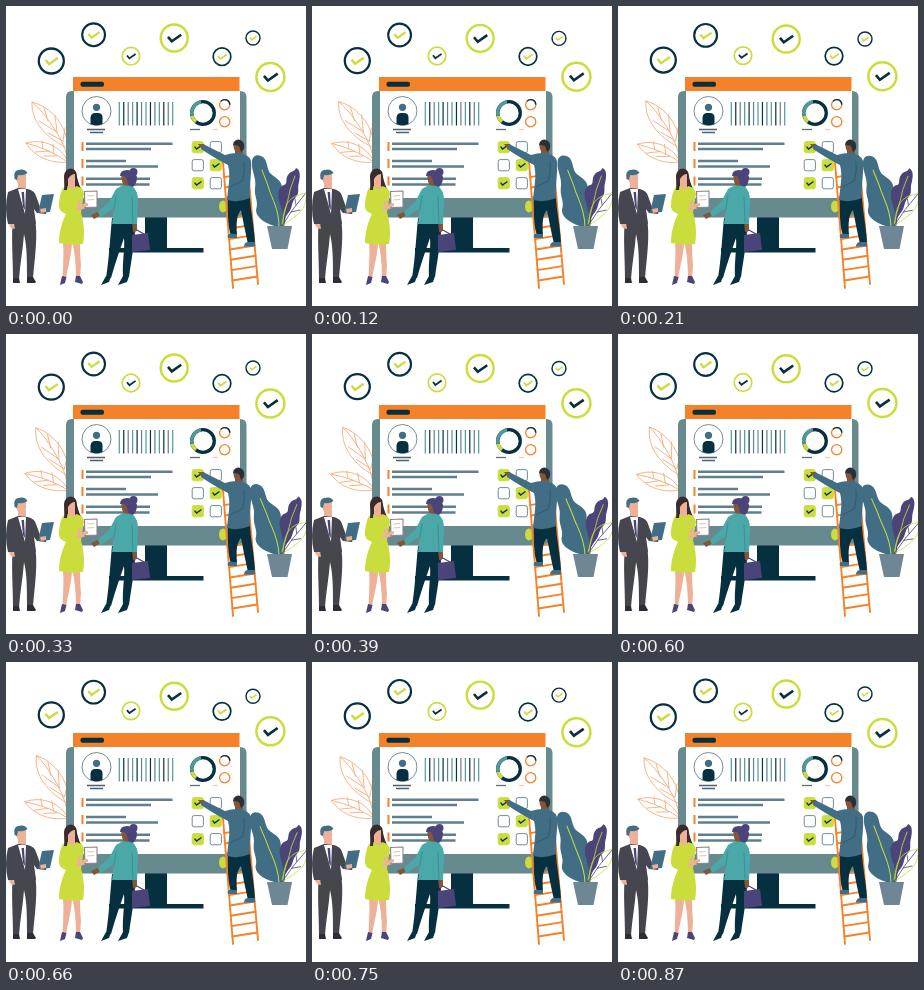
Animation, 300 px wide and 300 px high, one loop 0.9 s. Source, as an HTML page:

```html
<!DOCTYPE html>
<html lang="en">
<head>
<meta charset="utf-8">
<title>Checklist team</title>
<style>
html, body { margin: 0; width: 100%; height: 100%; overflow: hidden; background: #fff; }
svg { display: block; width: 100vw; height: 100vh; }
.navy { fill: #06303f; } .frame { fill: #678a8f; } .lime { fill: #cbdd3c; } .orange { fill: #f58229; }
.fair { fill: #eeb197; } .brown { fill: #85553b; } .teal { fill: #4aa9a8; } .blue { fill: #416e85; } .purple { fill: #4b4478; }
.line { fill: none; stroke-linecap: round; stroke-linejoin: round; }
</style>
</head>
<body>
<svg viewBox="0 0 300 300">
  <!-- outlined leaves -->
  <g class="line" stroke="#f7ad7c" stroke-width="0.9">
    <g id="leafTop">
      <path d="M62 142C45 135 25 119 26 96C45 101 61 119 62 142M62 156Q60 140 48 122T26 96M57 135L42 127M51 126L33 115M51 126L49 109M57 135L59 122M42 115L38 102"/>
    </g>
    <g id="leafLow">
      <path d="M62 156C47 158 29 152 20 137C38 132 56 141 62 156M62 156Q43 143 20 137M51 150L38 150M43 145L29 146M48 148L47 138M37 142L36 135"/>
    </g>
  </g>

  <!-- monitor -->
  <path class="navy" d="M139 209H161V242H197.500V246.500H103V242H139Z"/>
  <path class="frame" d="M66 85H234Q240.500 85 240.500 91V206Q240.500 211.500 235 211.500H65Q60 211.500 60 206V91Q60 85 66 85Z"/>
  <path fill="#fff" d="M68 85H234V192H68Z"/>
  <path class="orange" d="M67 71H233.500V85H67Z"/>
  <rect class="navy" x="74.500" y="75.800" width="23.500" height="5" rx="2"/>
  <circle cx="90.500" cy="105" r="14.500" fill="#fff" stroke="#587080" stroke-width=".8"/>
  <circle class="blue" cx="90.500" cy="101.300" r="3.600"/>
  <path class="navy" d="M84.500 118V111.500Q85 107 89 107H92Q96.500 107 96.500 111.500V118Q90.500 120.500 84.500 118Z"/>
  <path stroke="#496070" stroke-width="1.400" d="M81 123.500H99M84 126.500H97"/>
  <g id="bars"></g>
  <g fill="none" stroke-width="3.300">
    <circle cx="197" cy="107" r="11.300" stroke="#06303f"/>
    <path stroke="#4f9a9c" d="M185.900 109A11.300 11.300 0 0 1 195 95.900"/>
    <path stroke="#cbdd3c" d="M190 115.900A11.300 11.300 0 0 1 186 109.500"/>
  </g>
  <path stroke="#587080" stroke-width="1.300" d="M184 123.500H194"/>
  <path stroke="#f9c9a8" stroke-width="1.300" d="M207 123.500H212"/>
  <g fill="none" stroke="#f58229" stroke-width="1.300">
    <circle cx="218.700" cy="98.700" r="5.100"/>
    <circle cx="218.700" cy="115.700" r="5.100"/>
    <path stroke="#06303f" d="M215 95.200A5.100 5.100 0 0 1 223.800 98.700"/>
  </g>
  <path class="orange" d="M75.500 136h2v9h-2zM75.500 153h2v9h-2zM75.500 170.500h2v9h-2z"/>
  <path stroke="#5f7f90" stroke-width="2.500" d="M80 137.700H166.500M80 143H145M80 155H120M80 160.500H152M80 172.700H144M80 178.500H143.500"/>
  <g id="boxes"></g>

  <!-- plant -->
  <g id="leafLeft">
    <path class="blue" d="M272 221C260 218 250 212 250 204C253 195 248 191 249 182C251 172 245 165 246 156C246 151 250 148 255 150C262 153 260 161 264 167C269 172 276 174 276 182C275 189 280 193 279 200C278 207 281 213 278 221Z"/>
    <path class="line" stroke="#cbdd3c" stroke-width="1" d="M273 221C273 203 266 193 263 183C261 176 258 170 256 164"/>
  </g>
  <g id="leafRight">
    <path class="purple" d="M275 219C280 210 275 203 273 194C271 185 274 180 278 179C282 178 279 173 282 169C285 164 288 167 290 162C295 164 294 171 293 176C291 182 294 187 290 191C285 196 287 201 283 206C279 211 278 215 277 220Z"/>
    <path class="line" stroke="#cbdd3c" stroke-width=".8" d="M276 218C279 204 282 195 284 184L289 170"/>
  </g>
  <g id="leafOut">
    <path class="line" stroke="#cbdd3c" stroke-width=".8" d="M277 219C277 207 279 196 288 191C292 188 296 189 301 186C300 195 299 202 292 208Q287 213 277 219"/>
    <path class="line" stroke="#4b4478" stroke-width=".8" d="M276 220Q286 203 299 188M285 206L294 204M290 199L289 193"/>
  </g>
  <path fill="#6f8795" d="M261 220H286L281.500 243H266Z"/>

  <!-- ladder and climber -->
  <ellipse class="lime" cx="217" cy="200.500" rx="4" ry="6"/>
  <g id="ladder" class="line" stroke="#f58229" stroke-width="1.900"></g>
  <path class="navy" d="M222 191L244 189C244 202 248 218 249 237L242 238C239 225 237 214 235 204C231 208 230 216 231 229L225 230C221 216 222 203 222 191Z"/>
  <path class="blue" d="M223 228H231V232H222Q221 229 223 228ZM241 236H249V240.500H238Q238 237 241 236Z"/>
  <path class="brown" d="M229 140H237V150H229ZM192 138L198 138L200 142L195 142Z"/>
  <path class="blue" d="M197 138L219 149Q225 147 231 147Q242 147 245 155C246 167 243 179 244 192Q233 197 221 194C222 181 225 170 222 159Q210 153 195 143Z"/>
  <path class="line" stroke="#31586d" stroke-width=".9" d="M238 156Q239 167 236 175L224 181"/>
  <path class="brown" d="M227 138H236V146Q230 148 228 143Z"/>
  <path fill="#2b2f38" d="M227 138.500Q228 133.500 233 133.500Q239.500 135 238 143L235 146L233 140Z"/>

  <!-- man in suit -->
  <path fill="#44464c" d="M7 213H29C32 229 29 250 27 272H21C21 255 21 240 18 228C17 243 14 258 13 273H7C7 252 5 232 7 213Z"/>
  <path fill="#2d2d38" d="M7 272H13L14 277H7ZM21 271H27L30 276L29 277H21Z"/>
  <path class="fair" d="M12 176H20V187H12ZM2 217H8L9 223L5 222Z"/>
  <path fill="#45464f" d="M2 186L12 182L22 183Q29 185 30 190L34 201L41 203L40 208L31 207L28 203L30 218H7L8 205L8 218L2 218Q-2 202 2 186Z"/>
  <path fill="#fff" d="M12 183L20 183L19 208Z"/>
  <path class="purple" d="M15.500 186L18 186L19 204L17 201Z"/>
  <path class="fair" d="M10 167H20V174Q19 180 15 180Q11 178 10 172Z"/>
  <path class="blue" d="M8.500 173Q7 165 12 164Q19 162 21.500 167Q17 170 12 169L11 174Z"/>
  <path class="blue" d="M36 189L48 188L44 206L32 207Z"/>
  <path class="fair" d="M34 203L40 202L40 206L35 207Z"/>

  <!-- woman in dress -->
  <path fill="#3a2c2e" d="M58 170Q59 162.500 65 162.500Q71 163 71 171Q73 180 76 184L72 194H62Q58 184 58 170Z"/>
  <path class="fair" d="M57 235H66C66 248 62 260 60 273H56.500C57 260 58 247 57 235ZM66 235H74Q74 249 75 259L74 273H70Q70 250 66 235Z"/>
  <path class="purple" d="M56 270L60.500 271L59 277L54 279ZM70 270H74L77 276L76 278L69 276Z"/>
  <path class="fair" d="M62 173H69V185H62Z"/>
  <path class="lime" d="M57 182L62 180L67 184L70 180Q77 181 78 188L75 206C78 218 79 228 77 238Q65 240 53 237C53 226 56 216 60 208L56 206Q52 203 53 197Q54 187 57 182Z"/>
  <path class="fair" d="M61 168H69V174Q68 179 65 179Q61 177 61 172Z"/>
  <path fill="#3a2c2e" d="M59 173Q59 163.500 65 163.500Q71 164.500 71 173L69 168Q65 168 62 173L61 184L58 184Z"/>
  <path class="line" stroke="#eeb197" stroke-width="3" d="M74 195L72 203L81 200"/>
  <path fill="#fff" stroke="#8c8390" stroke-width="1.100" d="M78.500 185.500L91 185V201L79 201.500Z"/>
  <path stroke="#e3c4b8" d="M81 190L88 189.500M81 194L88 193.500"/>
  <path class="fair" d="M76 198L82 197V200L77 201Z"/>

  <!-- woman with bag -->
  <path class="navy" d="M106 212H130C130 228 126 250 123 271H117C116 256 119 243 118 232C113 246 109 258 105 272H100C103 254 104 233 106 212Z"/>
  <path class="navy" d="M100 270H105L103 276L95 279ZM117 270H123L121 276L112 279Z"/>
  <path class="brown" d="M117 174H126V186H117ZM85 209L94 205L95 209L88 213Z"/>
  <path class="line" stroke="#4b4478" stroke-width="1.200" d="M128 229L129 223L138 228"/>
  <path class="purple" d="M126 229L142 227L144 244L126 246Z"/>
  <path class="brown" d="M126 215H131V225L127 226Z"/>
  <path class="teal" d="M110 183L117 179L126 180Q132 184 132 195L131 218H106L108 202L94 211L92 206L103 196Z"/>
  <path class="line" stroke="#378d90" stroke-width=".9" d="M126 191L127 217M110 190L108 203"/>
  <path class="brown" d="M115 168H123V179Q117 181 116 175Z"/>
  <path class="purple" d="M114 170Q114 164 121 164Q129 164 131 171Q131 178 127 181L122 179Q122 174 119 170Z"/>
  <circle class="purple" cx="127.500" cy="166" r="4"/>

  <g id="ticks"></g>
</svg>
<script>
const NS = "http://www.w3.org/2000/svg";
const NAVY = "#06303f", LIME = "#cbdd3c", TEAL = "#4f9a9c", SLATE = "#5f7f90";
const LOOP = 900, PEAK = 540, STEP = 30;
const get = id => document.getElementById(id);

function add(parent, tag, attrs) {
  const el = document.createElementNS(NS, tag);
  for (const key in attrs) el.setAttribute(key, attrs[key]);
  return parent.appendChild(el);
}

function check(parent, x, y, r, color, width) {
  add(parent, "path", {
    fill: "none", stroke: color, "stroke-width": width,
    d: `M${x - r * .46} ${y - r * .08}L${x - r * .18} ${y + r * .25}L${x + r * .52} ${y - r * .24}`
  });
}

const tones = [TEAL, NAVY, SLATE];
for (let i = 0; i < 13; i++) {
  add(get("bars"), "rect", { x: 112.7 + i * 4.45, y: 96, width: 1.2, height: 23.5, fill: tones[i % 3] });
}

for (let row = 0; row < 3; row++) for (let col = 0; col < 2; col++) {
  const x = 186.2 + col * 18, y = 135.6 + row * 18, on = (row + col) % 2 === 0;
  add(get("boxes"), "rect", {
    x, y, width: 11.2, height: 11.2, rx: 2,
    fill: on ? LIME : "#fff", stroke: on ? LIME : SLATE, "stroke-width": .9
  });
  if (on) check(get("boxes"), x + 5.6, y + 5.6, 7, NAVY, 1.4);
}

const ladder = get("ladder");
const left = k => `${217 + 10 * k} ${156 + 126 * k}`;
const right = k => `${241 + 11 * k} ${152 + 126 * k}`;
add(ladder, "path", { d: `M${left(0)}L${left(1)}M${right(0)}L${right(1)}` });
for (let i = 0; i < 11; i++) {
  const k = .12 + i * .082;
  add(ladder, "path", { d: `M${left(k)}L${right(k)}` });
}

// x, y, radius, vertical travel, lime ring
const ticks = [
  [45.3, 55, 12.5, -2.8, 0], [87.6, 28.8, 11.4, 1.8, 0], [125, 50.2, 8.8, -1.8, 1],
  [168.2, 32, 13.5, 3, 1], [216, 50.7, 8.8, -1.8, 0], [247, 32, 7, 3, 0], [264.4, 71, 14, -2.2, 1]
].map(([x, y, r, travel, lime]) => {
  const el = add(get("ticks"), "g", {});
  const ring = lime ? LIME : NAVY, mark = lime ? NAVY : LIME;
  add(el, "circle", { cx: x, cy: y, r, fill: "#fff", stroke: ring, "stroke-width": r * .15 + .4 });
  check(el, x, y, r, mark, r * .17 + .3);
  return { el, travel };
});

// element, degrees, pivot
const leaves = [
  ["leafTop", 5.5, 62, 156], ["leafLow", -5, 62, 156],
  ["leafLeft", -2.6, 275, 220], ["leafRight", 3.2, 275, 220], ["leafOut", 3, 277, 220]
].map(([id, turn, x, y]) => ({ el: get(id), turn, x, y }));

// slower out, quicker back
function swingAt(t) {
  const k = t < PEAK ? t / PEAK : (LOOP - t) / (LOOP - PEAK);
  return (1 - Math.cos(Math.PI * k)) / 2;
}

function draw(time) {
  const swing = swingAt(Math.floor((time % LOOP) / STEP) * STEP);
  for (const { el, travel } of ticks) el.setAttribute("transform", `translate(0 ${travel * swing})`);
  for (const { el, turn, x, y } of leaves) el.setAttribute("transform", `rotate(${turn * swing} ${x} ${y})`);
}

const start = performance.now();
function tick() {
  draw(performance.now() - start);
  requestAnimationFrame(tick);
}
tick();
</script>
</body>
</html>
```
